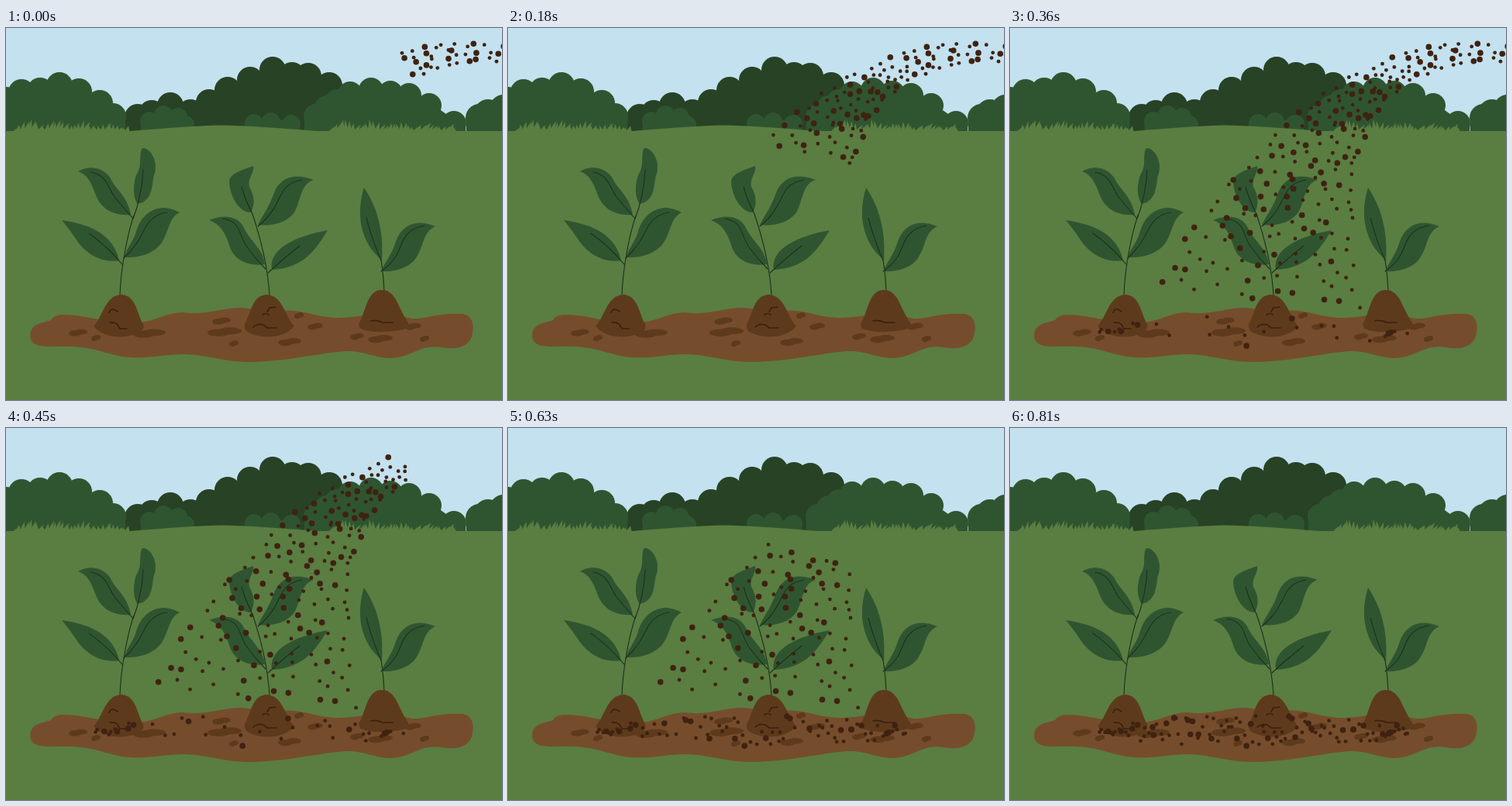
Write an HTML page that moves like this. It is 640x480 px and loops after 1620 ms.

```html
<!DOCTYPE html>
<html>
<head>
<meta charset="utf-8">
<style>
html, body { margin: 0; width: 100%; height: 100%; overflow: hidden; background: #5a7d42 }
svg { display: block; width: 640px; height: 480px }
.leaf { fill: #2f5530 }
.line { fill: none; stroke: #1c301c; stroke-width: 1.1; stroke-linecap: round }
.crack { fill: none; stroke: #3b200f; stroke-width: 1.7; stroke-linecap: round }
.mound { fill: #5e3a1c }
</style>
</head>
<body>
<svg viewBox="0 0 640 480">
  <rect width="640" height="133" fill="#c3e1ef"/>
  <g id="bushes"></g>
  <path fill="#5a7d42" d="M0 133H160Q240 126 278 125.500Q320 126 400 133H640V480H0Z"/>
  <g id="grass" fill="#5a7d42"></g>
  <path fill="#764d2c" d="M31 397C32 380 48 381 58 377C64 368 75 370 90 371C115 374 120 378 150 379C188 385 198 368 228 367C262 371 275 361 303 361C325 362 326 369 347 366C382 360 395 374 430 374C465 373 490 362 512 372C535 381 545 367 590 369C602 371 604 384 602 393C600 411 582 416 562 412C535 407 522 426 495 426C474 425 460 416 437 417C400 420 365 430 315 431C280 431 255 420 225 421C195 422 180 428 150 424C125 419 112 412 85 411C60 409 33 417 31 397Z"/>
  <g id="clods" class="mound"></g>
  <g class="line">
    <path d="M147 345C148 310 157 265 165 242"/>
    <path d="M340 345C338 310 328 270 318 240"/>
    <path d="M488 340C487 320 485 300 481 285"/>
  </g>
  <g class="leaf">
    <path d="M170 227C162 217 165 195 169 188C176 177 171 166 175 156Q178 153 185 159C193 167 195 181 191 190C188 199 191 223 170 227Z"/>
    <path d="M93 185C108 176 128 180 136 196C143 210 157 217 161 241C138 243 122 232 116 216C110 200 106 190 93 185Z"/>
    <path d="M72 248C100 252 138 262 146 300C120 304 100 288 90 272Q82 260 72 248Z"/>
    <path d="M152 296C155 285 165 275 168 262C175 240 190 232 205 232Q215 233 224 238C210 245 210 262 202 275C192 292 170 297 152 296Z"/>
    <path d="M316 238C300 238 288 215 288 197C290 188 302 184 319 178C321 186 311 195 314 205C320 216 322 226 316 238Z"/>
    <path d="M325 254C332 240 340 230 345 215C352 195 368 185 397 196C380 200 380 225 372 238C362 252 342 256 325 254Z"/>
    <path d="M262 248C280 240 300 242 307 258C315 275 332 285 334 305C310 308 293 298 288 280C283 264 276 253 262 248Z"/>
    <path d="M343 312C338 285 375 268 415 261C400 285 385 310 343 312Z"/>
    <path d="M462 206C475 225 488 255 485 299C465 285 448 250 462 206Z"/>
    <path d="M484 314C490 300 498 292 502 278C508 258 525 244 554 256C537 264 540 280 530 295C522 310 500 315 484 314Z"/>
  </g>
  <g class="line">
    <path d="M164 246Q175 218 177 183M110 186C130 190 131 205 140 218Q150 230 164 246M107 265Q130 281 150 305M152 297C175 275 175 262 185 250Q195 239 208 238"/>
    <path d="M304 205Q308 220 318 240M325 256C350 235 350 220 360 207Q368 198 382 196M280 246C305 250 300 270 312 284Q322 298 335 311M338 316Q355 300 379 281"/>
    <path d="M465 245Q472 272 484 300M484 314C512 294 506 278 518 266Q526 257 540 255"/>
  </g>
  <g class="mound">
    <path id="mound" d="M113 385C126 370 128 345 149 344C168 345 169 369 177 382Q179 389 172 393C150 403 125 399 113 385Z"/>
    <use href="#mound" transform="matrix(-1 0 0 1 485 0)"/>
    <path d="M455 382C465 366 465 338 485 338C504 338 506 363 519 380Q521 386 513 389C490 394 470 393 457 388Z"/>
  </g>
  <path class="crack" d="M133 367Q135 362 139 363L144 366M134 380Q141 379 144 383L147 388L156 388M331 370Q335 367 339 370M337 366L340 361L348 360M319 386Q324 381 332 383L337 387L349 387M471 378Q479 376 486 380L499 380"/>
  <g id="grains" fill="#3f2211"></g>
</svg>
<script>
const NS = "http://www.w3.org/2000/svg";
function add(parent, tag, attrs) {
  const el = document.createElementNS(NS, tag);
  for (const k in attrs) el.setAttribute(k, attrs[k]);
  return document.getElementById(parent).appendChild(el);
}

let seed = 7;
function rand() {
  seed = (seed * 16807) % 2147483647;
  return seed / 2147483647;
}
const lerp = (a, b, t) => a + (b - a) * t;

// Equal puffs touch the given crests; the bush is filled down to the horizon.
function bush(fill, r, crests) {
  const x0 = crests[0][0] - r * .95, x1 = crests.at(-1)[0] + r * .95;
  let d = `M${x0} 134V${crests[0][1] + r}`;
  for (const [x, top] of crests) {
    add("bushes", "circle", { cx: x, cy: top + r, r, fill });
    d += `L${x} ${top + r * .7}`;
  }
  add("bushes", "path", { d: d + `L${x1} ${crests.at(-1)[1] + r}V134Z`, fill });
}
const dark = "#284226", green = "#2f5530";
bush(dark, 17, [[170, 98], [188, 93], [212, 83], [238, 92], [262, 79], [286, 63], [315, 50], [344, 37], [369, 44], [390, 45], [417, 57]]);
bush(green, 12, [[185, 108], [203, 100], [222, 103], [231, 113]]);
bush(green, 12, [[320, 111], [342, 109], [368, 112]]);
bush(green, 17, [[0, 76], [20, 66], [44, 64], [69, 57], [94, 65], [121, 80], [138, 97]]);
bush(green, 16, [[400, 98], [414, 87], [427, 79], [444, 69], [471, 64], [496, 68], [520, 71], [546, 84], [578, 107]]);
bush(green, 18, [[611, 98], [622, 92], [642, 86]]);

// Leaning blades in clumps, tapering off to the right.
function grass(from, to) {
  for (let x = from; x < to; x += 4.5) {
    const clump = Math.abs(Math.sin((x - from) / 11));
    const h = (6 + 10 * clump * (.5 + rand() / 2)) * (1 - .4 * ((x - from) / (to - from)) ** 2);
    const tip = x + rand() * 11 - 3;
    add("grass", "path", { d: `M${x - 4} 135Q${x - 1} ${133 - h / 2} ${tip} ${133 - h}Q${x + 3} ${135 - h / 2} ${x + 4} 135Z` });
  }
}
grass(12, 160);
grass(420, 582);

function clod(x, y, w) {
  const h = 3.5 + w / 9;
  add("clods", "ellipse", { cx: x - w * .35, cy: y + h * .2, rx: w * .65, ry: h * .8 });
  add("clods", "ellipse", { cx: x + w * .3, cy: y - h * .2, rx: w * .7, ry: h * .75 });
}
[[93, 393, 12], [116, 400, 6], [185, 394, 21], [278, 378, 12], [282, 392, 22], [294, 407, 6], [366, 405, 15],
 [399, 385, 10], [378, 371, 6], [453, 398, 9], [483, 401, 16], [525, 385, 11], [540, 401, 6]]
  .forEach(c => clod(...c));

const grains = [];
function grain(cx, cy, from, to) {
  const r = rand() < .36 ? 3.8 : 2.4;
  grains.push({ el: add("grains", "circle", { cx, cy, r }), from, to });
}

// The stream lies between two curves that widen towards the soil.
const curve = (a, b, c, t) => lerp(lerp(a, b, t), lerp(b, c, t), t);
const upper = t => [curve(645, 389, 178, t), curve(16, -8, 340, t)];
const lower = t => [curve(645, 387, 462, t), curve(46, 35, 365, t)];

// Steps last 90 ms: the front passes these points, the tail follows five steps later.
const front = [.28, .53, .66, .83, 1], life = 5;
const rows = 34;
for (let row = 0; row < rows; row++) {
  const n = Math.round(2.5 + 8.5 * row / rows);
  for (let i = 0; i < n; i++) {
    const t = (row + .1 + rand() * .8) / rows;
    const across = (i + .15 + rand() * .7) / n;
    const [ax, ay] = upper(t), [bx, by] = lower(t);
    const born = front.findIndex(f => t <= f);
    grain(lerp(ax, bx, across), lerp(ay, by, across), born, born + life);
  }
}

// Grains that settle on the soil and stay there.
const settled = 105;
for (let i = 0; i < settled; i++) {
  const u = (i + rand()) / settled;
  const spread = 42 * Math.sqrt(Math.sin(Math.PI * u));
  grain(lerp(112, 516, u), 391 + (rand() - .5) * spread, 4 + Math.floor(rand() * 5), Infinity);
}

let shown = -1;
function frame() {
  const step = Math.min(9, Math.floor(performance.now() % 1620 / 90));
  if (step !== shown) {
    shown = step;
    for (const g of grains)
      g.el.style.display = step >= g.from && step < g.to ? "" : "none";
  }
  requestAnimationFrame(frame);
}
frame();
</script>
</body>
</html>
```
